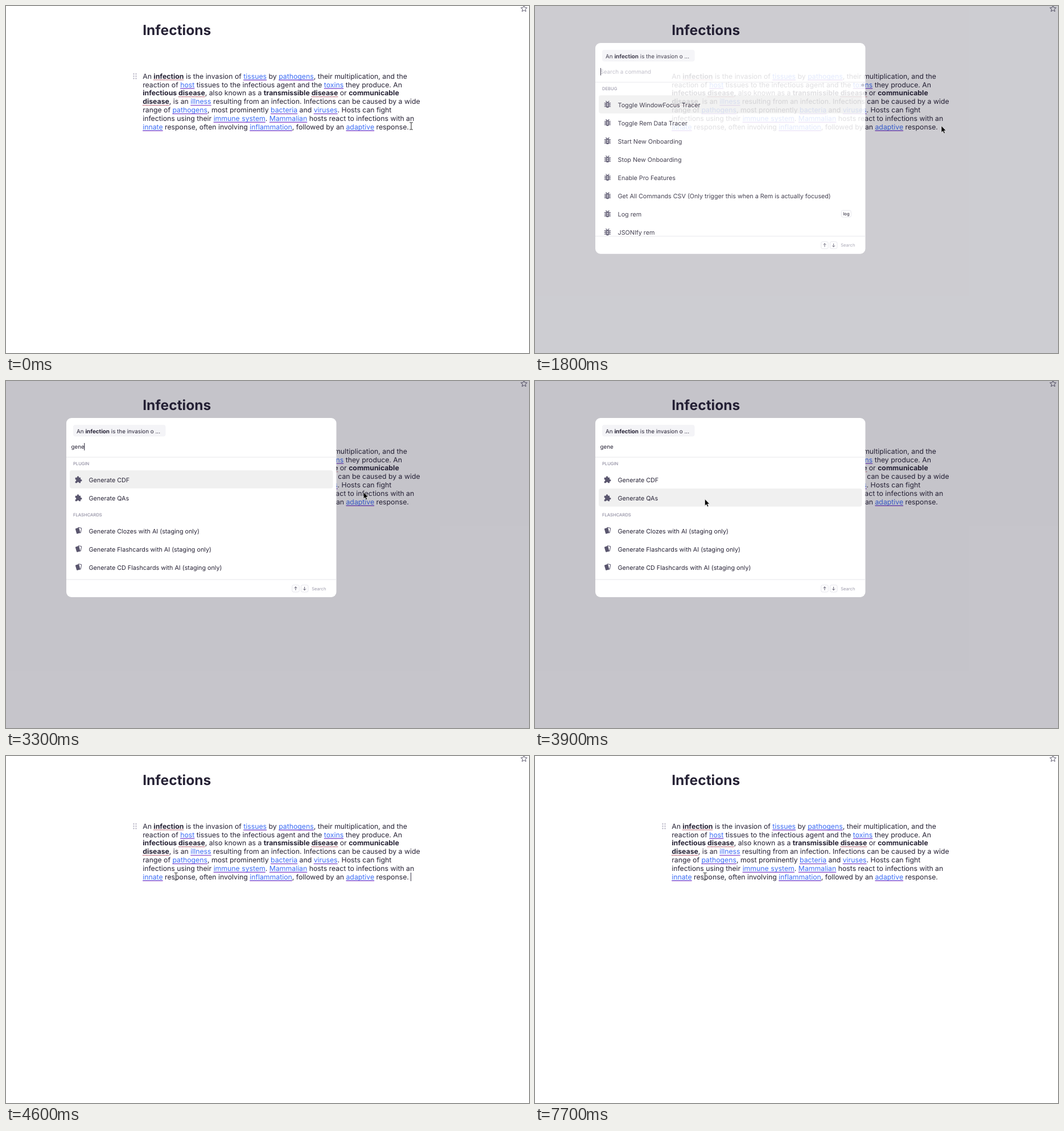
An HTML page for the animation above (8000 ms loop, 919 by 610 pixels).

```html
<!DOCTYPE html>
<html lang="en">
<head>
<meta charset="utf-8">
<title>Infections</title>
<style>
  html, body { margin: 0; width: 100%; height: 100%; overflow: hidden; background: #fff; }
  svg { display: block; }
  text {
    font-family: Inter, "Noto Sans", sans-serif;
    font-optical-sizing: none;
    text-rendering: geometricPrecision;
    white-space: pre;
    fill: #272336;
  }
  .b { font-weight: 700; }
  .link { fill: #3b6cf5; }
</style>
</head>
<body>
<svg id="stage" width="919" height="610" viewBox="0 0 919 610"></svg>
<script>
const LOOP = 8000;
const stage = document.getElementById('stage');

function el(tag, attrs, parent) {
  const node = document.createElementNS('http://www.w3.org/2000/svg', tag);
  for (const key in attrs) node.setAttribute(key, attrs[key]);
  parent.appendChild(node);
  return node;
}
const group = (parent, attrs = {}) => el('g', attrs, parent);
const rect = (parent, x, y, width, height, fill, rx = 0) =>
  el('rect', { x, y, width, height, fill, rx }, parent);
const path = (parent, d, attrs) => el('path', { d, ...attrs }, parent);

// Marks: [link]  *bold*  ~bold, misspelt~
function text(parent, x, y, size, content, attrs = {}) {
  const node = el('text', { x, y, 'font-size': size, ...attrs }, parent);
  const runs = [];
  for (const part of content.split(/(\[.*?\]|\*.*?\*|~.*?~)/)) {
    if (!part) continue;
    const mark = '[*~'.includes(part[0]) ? part[0] : '';
    const span = el('tspan', mark ? { class: mark === '[' ? 'link' : 'b' } : {}, node);
    span.textContent = mark ? part.slice(1, -1) : part;
    runs.push({ mark, span });
  }
  for (const { mark, span } of runs) {
    if (mark !== '[' && mark !== '~') continue;
    const from = span.getStartPositionOfChar(0).x;
    const width = span.getComputedTextLength();
    if (mark === '[') {
      rect(parent, from, y + 1.6, width, 0.6, '#3b6cf5');
      rect(parent, from, y + 2.1, width, 0.9, '#9032bd');
    } else {
      path(parent, `M${from} ${y + 2.2}h${width}`,
        { stroke: '#a3283c', 'stroke-width': 1, 'stroke-dasharray': '1.6 0.8' });
    }
  }
  return node;
}

// Page
const page = group(stage);
text(page, 240.2, 51.3, 24.54, '*Infections*');
[
  'An ~infection~ is the invasion of [tissues] by [pathogens], their multiplication, and the',
  'reaction of [host] tissues to the infectious agent and the [toxins] they produce. An',
  '*infectious *~disease~, also known as a *transmissible *~disease~ or *communicable*',
  '~disease~, is an [illness] resulting from an infection. Infections can be caused by a wide',
  'range of [pathogens], most prominently [bacteria] and [viruses]. Hosts can fight',
  'infections using their [immune system]. [Mammalian] hosts react to infections with an',
  '[innate] response, often involving [inflammation], followed by an [adaptive] response.'
].forEach((line, i) => text(page, 240.2, 127.7 + i * 14.86, 12.27, line));

const star = Array.from({ length: 10 }, (_, i) => {
  const r = i % 2 ? 2.6 : 5.8, a = i * Math.PI / 5;
  return `${910.2 + r * Math.sin(a)} ${4.9 - r * Math.cos(a)}`;
}).join('L');
path(page, `M${star}Z`, { fill: 'none', stroke: '#5d5a6e', 'stroke-width': 1, 'stroke-linejoin': 'round' });

const handle = group(page);
for (let i = 0; i < 6; i++)
  el('circle', { cx: 224.5 + (i % 2) * 4, cy: 119.5 + (i >> 1) * 4, r: 1.15, fill: '#b3b1c2' }, handle);
const pageCaret = rect(page, 711, 205, 1, 15, '#3a374a');

// Command palette
const INK = '#5a566e';
const icons = {
  bug(g) {
    rect(g, -3.1, -4.4, 6.2, 10.2, INK, 3.1);
    path(g, 'M-3-6l2 2M3-6l-2 2M-5.7-2.3h11.4M-5.7.6h11.4M-5.7 3.5h11.4',
      { stroke: INK, 'stroke-width': 1.4 });
    rect(g, -1.4, -1.5, 2.8, 1.3, '#fff');
    rect(g, -1.4, 1.4, 2.8, 1.3, '#fff');
  },
  puzzle(g) {
    path(g, 'M-5.7-3.3H-2.6V-4.2a1.7 1.7 0 0 1 3.4 0V-3.3H3.7V-.1H4.4a1.7 1.7 0 0 1 0 3.4' +
      'H3.7V6.2H.9a1.7 1.7 0 0 0-3.4 0H-5.7V3.3a1.7 1.7 0 0 0 0-3.4z', { fill: INK });
  },
  cards(g) {
    el('rect', { x: -1.5, y: -5.2, width: 6, height: 8.6, rx: 1, fill: 'none', stroke: INK, transform: 'rotate(12)' }, g);
    el('rect', { x: -4.6, y: -4.6, width: 6.6, height: 9.6, rx: 1, fill: INK, transform: 'rotate(-16)' }, g);
  }
};

const palette = group(stage);
rect(palette, 0, 0, 919, 610, 'rgba(27,23,47,.25)');
const panel = rect(palette, 106, 65, 474.5, 371, '#fff', 9);
rect(palette, 118, 77, 162.5, 20.5, '#f4f4f7', 4);
text(palette, 124, 91.5, 9.85, 'An *infection* is the invasion o ...');
const hint = text(palette, 114.5, 119.2, 9.82, 'Search a command');
hint.firstChild.style.fill = '#b9b7c3';
const query = text(palette, 114.5, 119.2, 9.82, ' ');
const queryCaret = rect(palette, 115, 109, 1, 13, '#272336');
rect(palette, 106, 133.5, 474.5, 1, '#e7e7ec');
const highlight = rect(palette, 112, 157, 462.5, 31.7, '#f0f0f0', 4);

function label(parent, y, content) {
  text(parent, 118, y, 7.6, content, { 'font-weight': 500, style: 'fill:#8f8ca0' });
}
function row(parent, y, icon, content) {
  icons[icon](group(parent, { transform: `translate(127.4 ${y - 0.9})` }));
  text(parent, 145.6, y + 4, 10.74, content);
}
const PITCH = 32.07;
const clip = el('clipPath', { id: 'list' }, el('defs', {}, stage));
rect(clip, 106, 134, 475, 270, '#000');

const allList = group(palette, { 'clip-path': 'url(#list)' });
label(allList, 148.2, 'DEBUG');
[
  'Toggle WindowFocus Tracer', 'Toggle Rem Data Tracer', 'Start New Onboarding',
  'Stop New Onboarding', 'Enable Pro Features',
  'Get All Commands CSV (Only trigger this when a Rem is actually focused)',
  'Log rem', 'JSONIfy rem'
].forEach((name, i) => row(allList, 174 + i * PITCH, 'bug', name));
const keyBox = (parent, x, y, w, h) =>
  el('rect', { x, y, width: w, height: h, rx: 2.5, fill: '#fff', stroke: '#dedde6', 'stroke-width': 0.8 }, parent);
keyBox(allList, 538.3, 359.3, 17, 11.8);
text(allList, 541.4, 367.8, 7.67, 'log', { 'font-weight': 500 });
rect(allList, 573.5, 136.5, 5, 5, '#c4c3cc', 2.5);

const foundList = group(palette);
label(foundList, 148.2, 'PLUGIN');
['Generate CDF', 'Generate QAs'].forEach((name, i) => row(foundList, 174 + i * PITCH, 'puzzle', name));
label(foundList, 237.7, 'FLASHCARDS');
['Clozes', 'Flashcards', 'CD Flashcards'].forEach((name, i) =>
  row(foundList, 263.7 + i * PITCH, 'cards', `Generate ${name} with AI (staging only)`));

const footer = group(palette);
rect(footer, 106, 0, 474.5, 1, '#e7e7ec');
[[509, 1], [524.7, -1]].forEach(([x, dir]) => {
  keyBox(footer, x - 6.2, 10.2, 12.4, 12.2);
  path(footer, `M${x} ${16.3 + 3 * dir}v${-6 * dir}m-2.4 ${2.4 * dir}l2.4 ${-2.4 * dir}l2.4 ${2.4 * dir}`,
    { fill: 'none', stroke: '#4b485e', 'stroke-width': 0.9 });
});
text(footer, 537.2, 19.2, 7.6, 'Search', { style: 'fill:#9d9bab' });

// Pointers
const arrow = group(stage);
path(arrow, 'M.4.6V12.4l2.7-2.5 1.9 4.3 2-.9-1.9-4.1H8.8z',
  { fill: '#000', stroke: '#fff', 'stroke-width': 0.7, 'stroke-linejoin': 'round' });
const beam = group(stage);
const beamShape = 'M-2.8-6.2H-.8L0-5.6.8-6.2H2.8M0-5.6V5.6M-2.8 6.2H-.8L0 5.6.8 6.2H2.8';
path(beam, beamShape, { fill: 'none', stroke: '#fff', 'stroke-width': 2, opacity: 0.7 });
path(beam, beamShape, { fill: 'none', stroke: '#222', 'stroke-width': 1 });

// Each step overrides what came before it.
const steps = [
  [0, { handle: 1, caret: 0, fade: 0, query: '', found: 0, pick: 0, beam: [712, 211] }],
  [200, { caret: 1, beam: [713.8, 211.5] }],
  [600, { caret: 0 }],
  [1100, { caret: 1 }],
  [1200, { handle: 0 }],
  [1800, { fade: 0.86, beam: null, arrow: [713.6, 210] }],
  [1900, { fade: 1 }],
  [2500, { query: 'g' }],
  [3300, { query: 'gene', found: 1, arrow: [627.8, 194.8] }],
  [3600, { caret: 0, pick: 1, arrow: [360, 195] }],
  [3900, { arrow: [298, 207] }],
  [4100, { caret: 1 }],
  [4400, { arrow: null, beam: [298.7, 210.8] }],
  [4600, { fade: 0, handle: 1, beam: [298.7, 211.5] }],
  [5100, { caret: 0 }],
  [5800, { caret: 1 }],
  [6200, { caret: 0 }],
  [6900, { caret: 1 }],
  [7700, { caret: 0 }]
];
const caretX = { '': 115, g: 120, gene: 137.3 };

const show = (node, on) => node.setAttribute('visibility', on ? 'visible' : 'hidden');
const display = (node, on) => { node.style.display = on ? '' : 'none'; };
function place(node, at) {
  display(node, at);
  if (at) node.setAttribute('transform', `translate(${at[0]} ${at[1]})`);
}

function render(time) {
  const s = Object.assign({}, ...steps.filter(([at]) => at <= time).map(step => step[1]));
  show(handle, s.handle);
  show(pageCaret, s.caret && !s.fade);
  display(palette, s.fade);
  palette.setAttribute('opacity', s.fade);
  display(hint, !s.query);
  query.textContent = s.query;
  show(queryCaret, s.caret);
  queryCaret.setAttribute('x', caretX[s.query]);
  highlight.setAttribute('y', 157 + s.pick * PITCH);
  panel.setAttribute('height', s.found ? 315 : 370.7);
  footer.setAttribute('transform', `translate(0 ${s.found ? 348.5 : 404.2})`);
  display(allList, !s.found);
  display(foundList, s.found);
  place(arrow, s.arrow);
  place(beam, s.beam);
}

const start = performance.now();
function tick() {
  render((performance.now() - start) % LOOP);
  requestAnimationFrame(tick);
}
tick();
</script>
</body>
</html>
```
